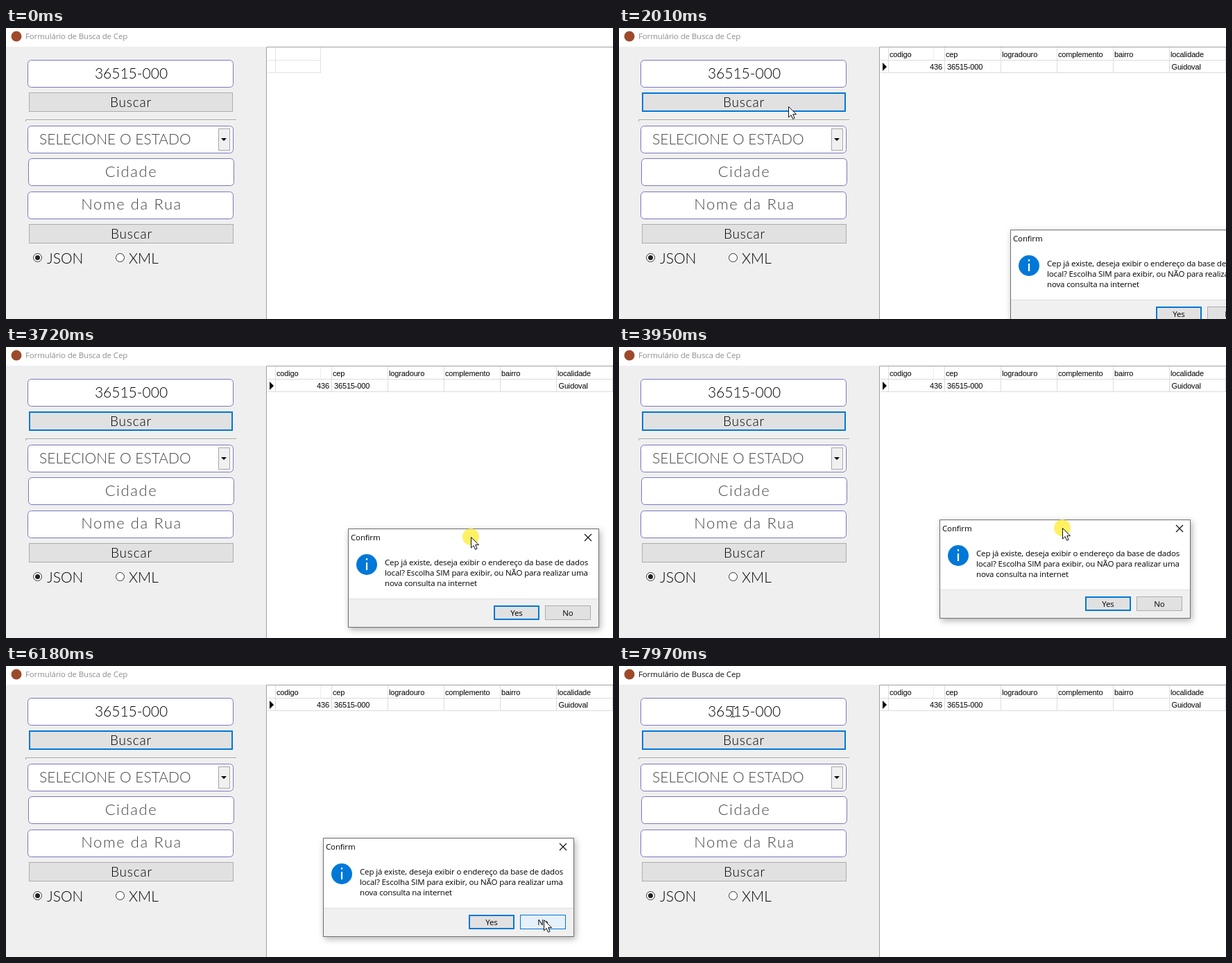
An HTML page that plays this animation: 875 by 420 pixels, repeating every 8 s.

```html
<!DOCTYPE html>
<html lang="pt-BR">
<head>
<meta charset="utf-8">
<title>Formulário de Busca de Cep</title>
<style>
  html, body { margin: 0; width: 100%; height: 100%; overflow: hidden; background: #fff; }
  svg { display: block; width: 875px; height: 420px; }
  .ui { font: 11.5px "Open Sans", sans-serif; letter-spacing: -.14px; }
  .grid { font: 11px "Liberation Sans", sans-serif; letter-spacing: -.15px; }
  .form { font: 300 21px Lato, sans-serif; }
  .wide { font-size: 22px; letter-spacing: 1.6px; }
  .hint { fill: #444; }
  .label { font-size: 19px; letter-spacing: .8px; }
  .mid { text-anchor: middle; }
  .field { fill: #fff; stroke: #7777c0; }
  .btn { fill: #e1e1e1; stroke: #adadad; }
  .focus { stroke: #0078d7; stroke-width: 2; }
  .hover { fill: #e5f1fb; stroke: #0078d7; }
  .press { fill: #cce4f7; stroke: #005499; }
  #dialog { filter: drop-shadow(2px 3px 5px rgba(0, 0, 0, .3)); }
</style>
</head>
<body>
<svg viewBox="0 0 875 420">
  <rect width="875" height="420" fill="#fff"/>
  <circle cx="15" cy="12" r="7.5" fill="#9c4a2b"/>
  <text id="title" class="ui" x="28" y="16">Formulário de Busca de Cep</text>

  <rect y="27" width="375" height="393" fill="#efefef"/>
  <path d="M875 27.5H375.5V420" fill="none" stroke="#a0a0a0"/>

  <g class="form">
    <rect class="field" x="31.5" y="46.5" width="296" height="39" rx="5"/>
    <text class="mid" x="180.5" y="73">36515-000</text>
    <rect id="search"/>
    <text class="mid label" x="180" y="114">Buscar</text>
    <path d="M29 133.5H332" stroke="#fff"/>
    <path d="M28.5 135V132.5H332" fill="none" stroke="#a0a0a0"/>

    <rect class="field" x="31.5" y="141.5" width="296" height="39" rx="5"/>
    <text class="hint" x="48" y="168">SELECIONE O ESTADO</text>
    <rect x="306.5" y="145.5" width="16" height="31" fill="#f0f0f0" stroke="#a6a6a6"/>
    <path d="M310 159h8l-4 4z"/>
    <rect class="field" x="32.5" y="188.5" width="296" height="39" rx="5"/>
    <text class="mid hint wide" x="180.5" y="215">Cidade</text>
    <rect class="field" x="31.5" y="236.5" width="296" height="39" rx="5"/>
    <text class="mid hint wide" x="181" y="262">Nome da Rua</text>
    <rect class="btn" x="33.5" y="283.5" width="294" height="27"/>
    <text class="mid label" x="181" y="304">Buscar</text>

    <g fill="#fff" stroke="#333"><circle cx="45.5" cy="331.5" r="6"/><circle cx="164.5" cy="331.5" r="6"/></g>
    <circle cx="45.5" cy="331.5" r="3.5" fill="#222"/>
    <text x="59" y="340">JSON</text>
    <text x="177" y="340">XML</text>
  </g>

  <path id="empty" d="M388.5 28V64.5M453.5 28V64.5M377 46.5H454M377 64.5H454" stroke="#e2e2e2"/>
  <g id="data" class="grid">
    <path d="M377 46.5H875M377 64.5H875M874.5 28V64" stroke="#dcdcdc"/>
    <path d="M453.5 28V46" stroke="#eee"/>
    <path d="M380 50l6 6-6 6z"/>
    <g id="heads" stroke-width="1"></g>
    <text x="466" y="60" text-anchor="end">436</text>
    <text x="473" y="60">36515-000</text>
    <text x="796.5" y="60">Guidoval</text>
  </g>

  <g id="dialog" class="ui">
    <rect x=".5" y=".5" width="361" height="142" fill="#fff" stroke="#707070"/>
    <path d="M1 101.5H361V142H1z" fill="#f0f0f0"/>
    <path d="M1 101.5H361" stroke="#dfdfdf"/>
    <text x="4" y="17">Confirm</text>
    <path d="M341 8l10 10m0-10l-10 10" stroke="#111" stroke-width="1.2"/>
    <circle cx="27" cy="52" r="15" fill="#0078d7"/>
    <path d="M27 49v11M27 43v2.5" stroke="#fff" stroke-width="2.2"/>
    <text x="53" y="53">Cep já existe, deseja exibir o endereço da base de dados</text>
    <text x="53" y="68">local? Escolha SIM para exibir, ou NÃO para realizar uma</text>
    <text x="53" y="83">nova consulta na internet</text>
    <rect id="yes"/>
    <text class="mid" x="243" y="126">Yes</text>
    <rect id="no"/>
    <text class="mid" x="317" y="126">No</text>
  </g>

  <circle id="glow" r="12" fill="#ffee3c" opacity=".8"/>
  <path id="arrow" d="M.5 .5V16l3.6-3.4 2.4 5.6 2.6-1.1-2.4-5.5H11.5z" fill="#fff" stroke="#111"/>
  <path id="beam" d="M-3-7.5h2.500l.5 .5 .5-.5H3M0-7V7M-3 7.500h2.500l.5-.5 .5 .5H3" fill="none" stroke="#111"/>
</svg>
<script>
const LOOP = 8000, STEP = 77;
const PRESS = 1540, RELEASE = 1690, LOADED = 1770, OPEN = 1850;
const GRAB = 3173, DROP = 4100, ANSWER = 6260, CLOSE = 6340;
const el = id => document.getElementById(id);

// Each pointer move eases from the previous place: start, end, x, y.
const moves = [
  [0, 1, 580, 440],
  [363, 671, 253, 143],
  [753, 1290, 244, 113],
  [2323, 2930, 848, 404],
  [2930, 3170, 741, 303],
  [GRAB, 4056, 634, 259.5],
  [DROP, 4550, 678, 325],
  [5333, 5600, 693, 365],
  [5640, 6180, 775, 366],
  [CLOSE, 6648, 616, 344],
  [6650, 7030, 262, 159],
  [7123, 7970, 164, 66]
];

el('heads').innerHTML = ['codigo', 'cep', 'logradouro', 'complemento', 'bairro', 'localidade'].map((name, i) =>
  `<path d="M${388.5 + 81 * i} 28V64" stroke="#dcdcdc"/><text x="${390 + 81 * i}" y="42">${name}</text>`).join('');

const smooth = k => k * k * (3 - 2 * k);
const between = (t, a, b) => t >= a && t < b;
const clamp = (v, a, b) => Math.min(b, Math.max(a, v));
const inside = ([px, py], [x, y, w, h]) => between(px, x, x + w) && between(py, y, y + h);

// The screen refreshes in whole steps, so the easing is sampled at them.
function pointer(t) {
  const i = moves.findLastIndex(m => m[0] <= t);
  const [start, end, x, y] = moves[i];
  const [, , fromX, fromY] = moves[Math.max(0, i - 1)];
  const elapsed = STEP * Math.floor((t - start) / STEP + .15);
  const k = smooth(clamp(elapsed / (end - start), 0, 1));
  return [Math.round(fromX + (x - fromX) * k), Math.round(fromY + (y - fromY) * k)];
}

function set(id, attributes) {
  for (const name in attributes) el(id).setAttribute(name, attributes[name]);
}
const show = (id, on) => set(id, { visibility: on ? 'visible' : 'hidden' });
const place = (id, x, y) => set(id, { transform: `translate(${x} ${y})` });

// The border lies fully inside the box, whatever its width.
function button(id, [x, y, width, height], focus, hover, press) {
  const look = press ? 'press' : hover ? 'hover' : focus ? 'focus' : '';
  const border = look === 'focus' ? 2 : 1;
  set(id, { class: 'btn ' + look, x: x + border / 2, y: y + border / 2, width: width - border, height: height - border });
}

const searchBox = [33, 93, 294, 28], editBox = [31, 46, 297, 40];
const yesBox = [210, 111, 66, 21], noBox = [284, 111, 66, 21];

function draw(t) {
  const tip = pointer(t);
  const open = between(t, OPEN, CLOSE);
  const searching = between(t, PRESS, RELEASE), dragging = between(t, GRAB + STEP, DROP), answering = between(t, ANSWER, CLOSE);

  set('title', { fill: between(t, PRESS, OPEN) || t >= CLOSE ? '#111' : '#8f8f8f' });
  show('empty', t < LOADED);
  show('data', t >= LOADED);

  // The dialog follows the pointer while it is dragged.
  const [dragX, dragY] = pointer(clamp(t, GRAB, DROP));
  const left = dragX - 177, top = dragY - 12;
  show('dialog', open);
  set('dialog', { opacity: clamp(.35 + Math.floor((t - OPEN) / STEP) * .35, 0, 1) });
  place('dialog', left, top);

  const local = [tip[0] - left, tip[1] - top];
  button('search', searchBox, t >= PRESS, !open && inside(tip, searchBox), searching);
  button('yes', yesBox, !answering, inside(local, yesBox));
  button('no', noBox, answering, inside(local, noBox), answering);

  const overText = inside(tip, editBox);
  show('glow', searching || dragging || answering);
  show('arrow', !overText);
  show('beam', overText);
  for (const id of ['glow', 'arrow', 'beam']) place(id, ...tip);
}

function tick() {
  draw(performance.now() % LOOP);
  requestAnimationFrame(tick);
}
tick();
</script>
</body>
</html>
```
